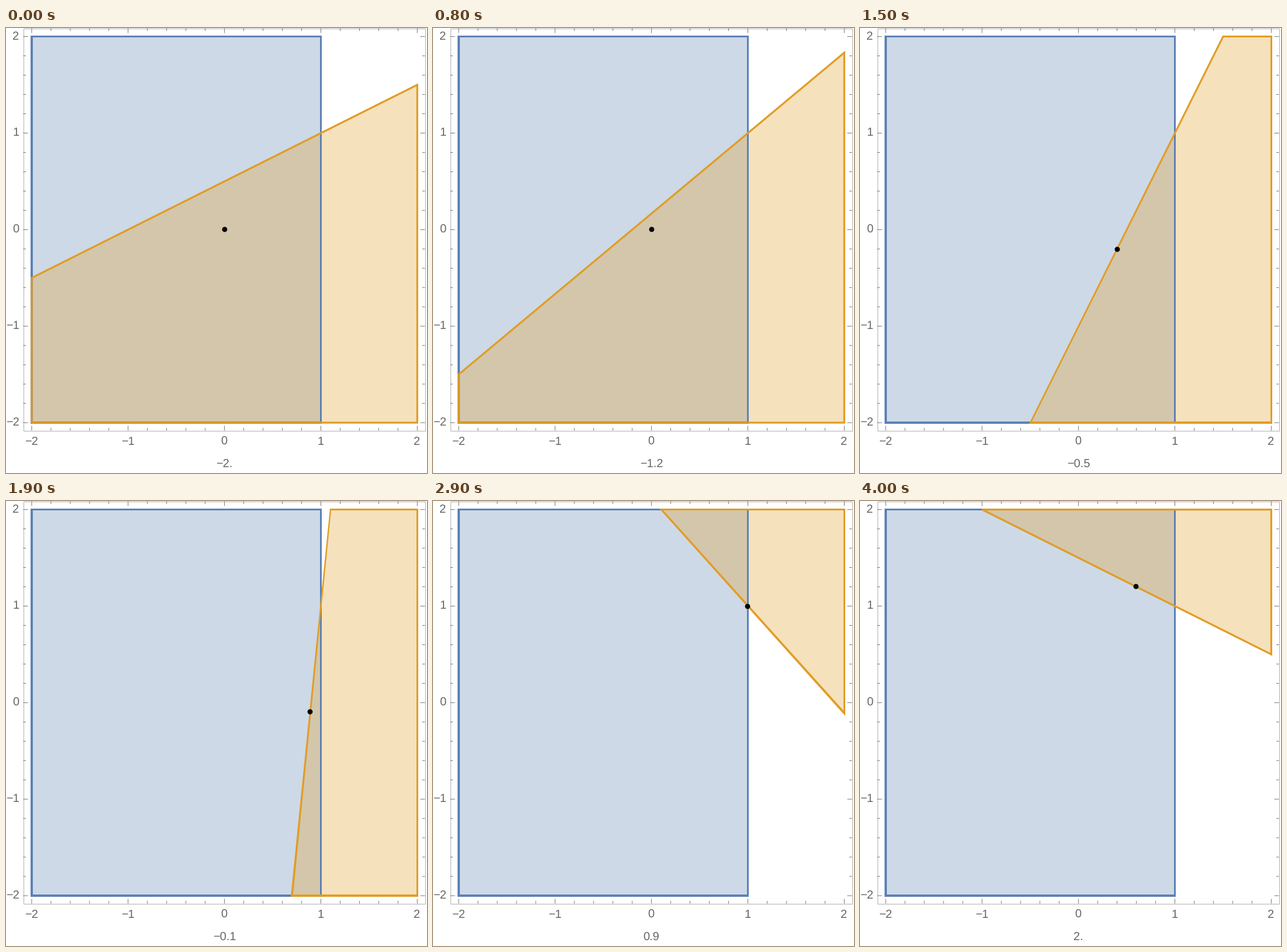
A matplotlib script for the animation above (4100 ms loop, 720 by 760 pixels).

```python
import numpy as np
import matplotlib.pyplot as plt
from matplotlib.animation import FuncAnimation
from matplotlib.collections import LineCollection
from matplotlib.patches import Circle, PathPatch, Polygon, Rectangle
from matplotlib.path import Path

W, H, DPI = 720, 760, 100
FRAMES, INTERVAL = 41, 100
CENTER = np.array([373.65, 344.35])
UNIT = 164.85
HALF_LINE = 1.6
MITER_LIMIT = 3.25
FONT_PX = 20
BLUE, ORANGE = "#5e81b5", "#e19c24"
BLUE_FILL = "#5c84af"
FRAME_GRAY, TICK_GRAY, TEXT_GRAY = "#b0b0b0", "#666666", "#666666"
LEFT, TOP, RIGHT, BOTTOM = 29.5, 0.5, 716.5, 687.5
SQUARE = [(-2, -2), (2, -2), (2, 2), (-2, 2)]

plt.rcParams["font.family"] = "Liberation Sans"
plt.rcParams["text.hinting"] = "none"

fig = plt.figure(figsize=(W / DPI, H / DPI), dpi=DPI, facecolor="white")
ax = fig.add_axes([0, 0, 1, 1])
ax.set_xlim(0, W)
ax.set_ylim(H, 0)
ax.axis("off")


def to_px(points):
    return CENTER + np.asarray(points, float) * [UNIT, -UNIT]


def clip_square(f):
    """Part of the square where the linear function f is not negative."""
    out = []
    for p, q in zip(SQUARE, SQUARE[1:] + SQUARE[:1]):
        fp, fq = f(*p), f(*q)
        if fp >= 0:
            out.append(p)
        if fp * fq < 0:
            t = fp / (fp - fq)
            out.append((p[0] + t * (q[0] - p[0]), p[1] + t * (q[1] - p[1])))
    return to_px(out)


def offset(points, d):
    """Move the polygon's edges outward by d, bevelling very sharp corners."""
    edges = np.roll(points, -1, axis=0) - points
    edges /= np.hypot(edges[:, 0], edges[:, 1])[:, None]
    normals = np.column_stack([-edges[:, 1], edges[:, 0]])
    out = []
    for v, n1, n2 in zip(points, np.roll(normals, 1, axis=0), normals):
        miter = (n1 + n2) / (1 + n1 @ n2)
        if d > 0 and np.hypot(*miter) > MITER_LIMIT:
            out += [v + d * n1, v + d * n2]
        else:
            out.append(v + d * miter)
    return np.array(out)


def closed(points):
    return Path(np.vstack([points, points[:1]]), closed=True)


def outline(points):
    outer = offset(points, HALF_LINE)
    inner = offset(points, -HALF_LINE)[::-1]
    return Path.make_compound_path(closed(outer), closed(inner))


def advance(s):
    widths = {".": 0.278, "\u2212": 0.584}
    return FONT_PX * sum(widths.get(c, 0.556) for c in s)


def label(x, baseline, s, align):
    return ax.text(x - align * advance(s), baseline, s, color=TEXT_GRAY,
                   fontsize=FONT_PX * 72 / DPI, ha="left", va="baseline", zorder=6)


def number(v):
    """One decimal at most, with a bare point after whole numbers."""
    s = f"{abs(v):.1f}"
    if s.endswith("0"):
        s = s[:-1]
    return ("\u2212" if v < 0 else "") + s


def draw_frame():
    ax.add_patch(Rectangle((LEFT, TOP), RIGHT - LEFT, BOTTOM - TOP, fill=False,
                           ec=FRAME_GRAY, lw=72 / DPI, zorder=1))
    ticks = []
    for i in range(-10, 11):
        x, y = to_px((i / 5, i / 5))
        size = 8 if i % 5 == 0 else 4.5
        ticks += [[(x, TOP), (x, TOP + size)], [(x, BOTTOM), (x, BOTTOM - size)],
                  [(LEFT, y), (LEFT + size, y)], [(RIGHT, y), (RIGHT - size, y)]]
    ax.add_collection(LineCollection(ticks, colors=TICK_GRAY, snap=False,
                                     linewidths=0.9 * 72 / DPI, zorder=1))
    for v in range(-2, 3):
        s = str(v).replace("-", "\u2212")
        x, y = to_px((v, v))
        label(x - 0.8, 712, s, 0.5)
        label(22.4, y + 5, s, 1)


def add_region(points, fill_color, line_color, z):
    fill = ax.add_patch(Polygon(points, fc=fill_color, ec="none", alpha=0.3, zorder=z))
    line = ax.add_patch(PathPatch(outline(points), fc=line_color, ec="none",
                                  zorder=z + 2))
    return fill, line


def half_plane(a):
    return clip_square(lambda x, y: x + a * y - (1 + a))


def nearest(a):
    """Point of the overlap closest to the origin."""
    if a <= -1:
        return 0, 0
    k = (1 + a) / (1 + a * a)
    return (1, 1) if k > 1 else (k, a * k)


def dot_center(a):
    """The dot sits on a grid of two pixels."""
    return tuple(2 * np.round(to_px(nearest(a)) / 2))


draw_frame()
add_region(clip_square(lambda x, y: 1 - x), BLUE_FILL, BLUE, 2)
fill, line = add_region(half_plane(-2), ORANGE, ORANGE, 2.5)
dot = ax.add_patch(Circle(dot_center(-2), 4.4, fc="black", ec="none", zorder=5))
caption = label(0, 750.5, "", 0)


def update(i):
    a = round(-2 + i / 10, 1)
    points = half_plane(a)
    fill.set_xy(points)
    line.set_path(outline(points))
    dot.center = dot_center(a)
    s = number(a)
    caption.set_text(s)
    caption.set_x(373.4 - advance(s) / 2)
    return fill, line, dot, caption


anim = FuncAnimation(fig, update, frames=FRAMES, interval=INTERVAL, repeat=True)
plt.show()
```
